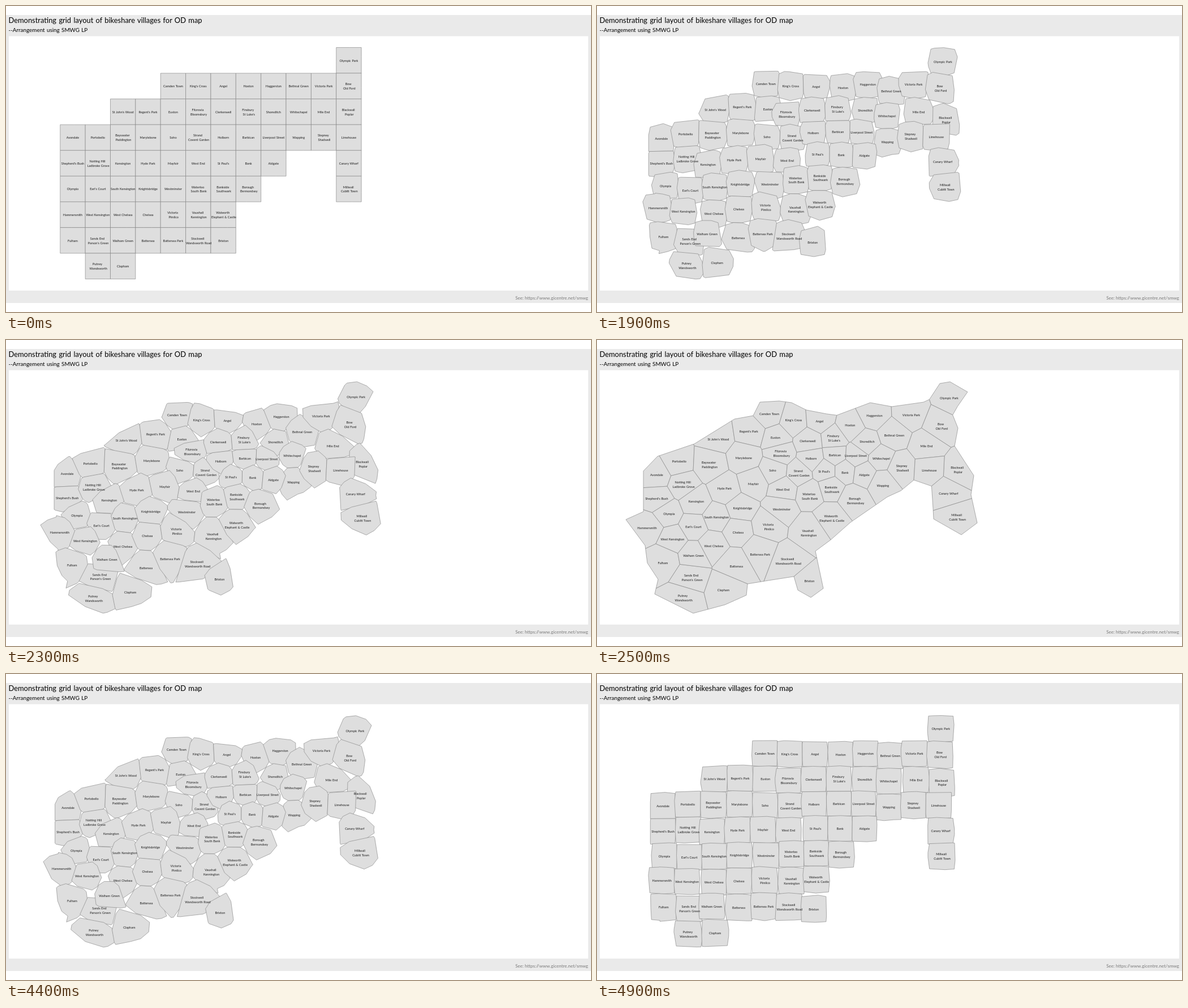
Recreate the animation shown at these times as an HTML page. Size 1034x542 px, loop 5000 ms.

```html
<!DOCTYPE html>
<html lang="en">
<head>
<meta charset="utf-8">
<title>Grid layout of bikeshare villages</title>
<style>
html, body { margin: 0; width: 100%; height: 100%; overflow: hidden; background: #fff; }
svg { display: block; width: 100%; height: 100%; font-family: Lato, "Open Sans", sans-serif; }
path { fill: #dedede; stroke: #7c7c7c; stroke-width: .6; stroke-linejoin: round; }
#labels { font-size: 5.55px; word-spacing: .3px; text-anchor: middle; fill: #1c1c1c; }
</style>
</head>
<body>
<svg viewBox="0 0 1034 542">
  <rect y="16" width="1034" height="510" fill="#eaeaea"/>
  <rect x="5" y="53.5" width="1024" height="450.5" fill="#fff"/>
  <text x="4.5" y="30.3" font-size="12.9" word-spacing="1">Demonstrating grid layout of bikeshare villages for OD map</text>
  <text x="4.5" y="46" font-size="9.9" word-spacing=".8">--Arrangement using SMWG LP</text>
  <text x="1029" y="519.5" font-size="8.05" text-anchor="end" fill="#7a7a7a">See: https://www.gicentre.net/smwg</text>
  <g id="cells"></g>
  <g id="labels"></g>
</svg>
<script>
const GRID = { x: 95.8, y: 73.5, w: 44.36, h: 45.56 };
const STEP = 100, LOOP = 5000, MORPH_STEPS = 9;

// Each row: first column, then villages with their place on the map; @n jumps to column n.
const rows = [
  [11, "Olympic Park 622 102"],
  [4, "Camden Town 304 130;King's Cross 347 141;Angel 393 143;Hoxton 447 150;Haggerston 490 133;Bethnal Green 525 168;Victoria Park 555 132;Bow/Old Ford 608 152"],
  [2, "St John's Wood 214 175;Regent's Park 268 161;Euston 315 172;Fitzrovia/Bloomsbury 325 200;Clerkenwell 372 178;Finsbury/St Luke's 418 173;Shoreditch 477 179;Whitechapel 502 209;Mile End 582 187;Blackwall/Poplar 637 229"],
  [0, "Avondale 105 238;Portobello 145 214;Bayswater/Paddington 198 220;Marylebone 259 208;Soho 310 230;Strand/Covent Garden 356 235;Holborn 378 209;Barbican 420 203;Liverpool Street 457 204;Wapping 505 257;Stepney/Shadwell 539 226;Limehouse 587 230"],
  [0, "Shepherd's Bush 105 280;Notting Hill/Ladbroke Grove 152 255;Kensington 175 285;Hyde Park 225 262;Mayfair 276 254;West End 328 264;St Paul's 401 232;Bank 438 234;Aldgate 472 238;@11 Canary Wharf 621 271"],
  [0, "Olympia 127 307;Earl's Court 170 330;South Kensington 211 313;Knightsbridge 257 297;Westminster 326 299;Waterloo/South Bank 375 276;Bankside/Southwark 414 264;Borough/Bermondsey 456 284;@11 Millwall/Cubitt Town 636 313"],
  [0, "Hammersmith 88 332;West Kensington 133 352;West Chelsea 206 364;Chelsea 249 340;Victoria/Pimlico 303 330;Vauxhall/Kennington 373 341;Walworth/Elephant & Castle 414 315"],
  [0, "Fulham 116 394;Sands End/Parson's Green 167 420;Walham Green 170 381;Battersea 246 400;Battersea Park 288 379;Stockwell/Wandsworth Road 337 391;Brixton 375 426"],
  [1, "Putney/Wandsworth 152 456;Clapham 223 442"]
];

// Turning points of the coastline, clockwise.
const border = (
  "624,74 655,92 628,131 638,156 632,188 666,240 661,274 672,324 644,345 595,317 592,259 " +
  "560,248 537,267 513,278 448,323 413,354 386,374 400,440 378,456 355,443 354,418 " +
  "309,425 266,432 264,452 226,469 170,484 102,450 108,424 89,395 85,364 51,318 82,304 " +
  "82,232 107,206 172,184 243,140 276,134 288,110 322,108 344,111 370,124 422,134 " +
  "483,111 521,118 585,109 606,77"
).split(" ").map(p => p.split(",").map(Number));

const dist2 = (a, b) => (a[0] - b[0]) ** 2 + (a[1] - b[1]) ** 2;
const mix = (a, b, k) => [a[0] + (b[0] - a[0]) * k, a[1] + (b[1] - a[1]) * k];
const cross = (a, b) => a[0] * b[1] - a[1] * b[0];
const minus = (a, b) => [a[0] - b[0], a[1] - b[1]];
const eachEdge = (poly, fn) => poly.forEach((p, i) => fn(p, poly[(i + 1) % poly.length]));

const villages = rows.flatMap(([first, text], row) => {
  let col = first;
  return text.split(";").map(item => {
    const [, jump, name, x, y] = item.match(/^(?:@(\d+) )?(.+) (\d+) (\d+)$/);
    if (jump) col = +jump;
    const place = [+x + .4, +y + .2];
    const home = [GRID.x + (col++ + .5) * GRID.w, GRID.y + (row + .5) * GRID.h];
    return { lines: name.split("/"), place, seed: place, home };
  });
});

// Keeps the part of a polygon that is nearer to a than to b.
function clip(poly, a, b) {
  const side = p => dist2(p, a) - dist2(p, b);
  const out = [];
  eachEdge(poly, (p, q) => {
    const sp = side(p), sq = side(q);
    if (sp <= 0) out.push(p);
    if (sp * sq < 0) out.push(mix(p, q, sp / (sp - sq)));
  });
  return out;
}

function region(v) {
  return villages.reduce((poly, o) => o === v ? poly : clip(poly, v.seed, o.seed), border);
}

function centroid(poly) {
  let area = 0, x = 0, y = 0;
  eachEdge(poly, (p, q) => {
    const c = cross(p, q);
    area += c;
    x += (p[0] + q[0]) * c;
    y += (p[1] + q[1]) * c;
  });
  return [x / area / 3, y / area / 3];
}

// Shifts the seeds until every region is centred on its village.
for (let i = 0; i < 8; i++) {
  const seeds = villages.map(v => {
    const off = minus(v.place, centroid(region(v)));
    return [v.seed[0] + off[0] * .3, v.seed[1] + off[1] * .3];
  });
  villages.forEach((v, n) => { v.seed = seeds[n]; });
}

// Distance from a centre to the edge of a polygon in direction d.
function reach(poly, centre, d) {
  let far = 0;
  eachEdge(poly, (p, q) => {
    const from = minus(p, centre), edge = minus(q, p), c = cross(d, edge);
    if (Math.abs(c) < 1e-9) return;
    const along = cross(from, d) / c;
    if (along >= -1e-6 && along <= 1 + 1e-6) far = Math.max(far, cross(from, edge) / c);
  });
  return far;
}

function add(parent, tag) {
  const el = document.createElementNS("http://www.w3.org/2000/svg", tag);
  return document.getElementById(parent).appendChild(el);
}

const halfW = GRID.w / 2, halfH = GRID.h / 2;
const box = [[-halfW, -halfH], [halfW, -halfH], [halfW, halfH], [-halfW, halfH]];

// Spokes run through the corners of both the square and the region.
for (const v of villages) {
  const poly = region(v);
  const corners = [...box, ...poly.map(p => minus(p, v.place))];
  const angles = corners.map(([x, y]) => Math.atan2(y, x)).sort((a, b) => a - b);
  v.spokes = angles.map(a => {
    const d = [Math.cos(a), Math.sin(a)];
    return { d, near: reach(box, [0, 0], d), far: reach(poly, v.place, d) };
  });
  v.path = add("cells", "path");
  v.texts = v.lines.map(line => {
    const el = add("labels", "text");
    el.textContent = line;
    return el;
  });
}

function draw(k) {
  for (const v of villages) {
    const [x, y] = mix(v.home, v.place, k);
    const pts = v.spokes.map(({ d, near, far }) => {
      const r = near + (far - near) * k;
      return [(x + d[0] * r).toFixed(2), (y + d[1] * r).toFixed(2)];
    });
    v.path.setAttribute("d", "M" + pts.join("L") + "Z");
    const two = v.texts.length > 1;
    v.texts.forEach((el, i) => {
      el.setAttribute("x", (two ? x - .8 + i * 1.6 : x).toFixed(2));
      el.setAttribute("y", (two ? y - 1.5 + i * 7.8 : y + 2.4).toFixed(2));
    });
  }
}

const clamp = n => Math.max(0, Math.min(1, n));

// Grid until 1.7 s, map from 2.5 s to 4.2 s, then back; moves in steps of 100 ms.
function progress(step) {
  return clamp((step - 16) / MORPH_STEPS) - clamp((step - 41) / MORPH_STEPS);
}

let shown = -1;
function tick(now) {
  const k = progress(Math.floor((now % LOOP) / STEP));
  if (k !== shown) draw(shown = k);
  requestAnimationFrame(tick);
}
draw(0);
requestAnimationFrame(tick);
</script>
</body>
</html>
```
